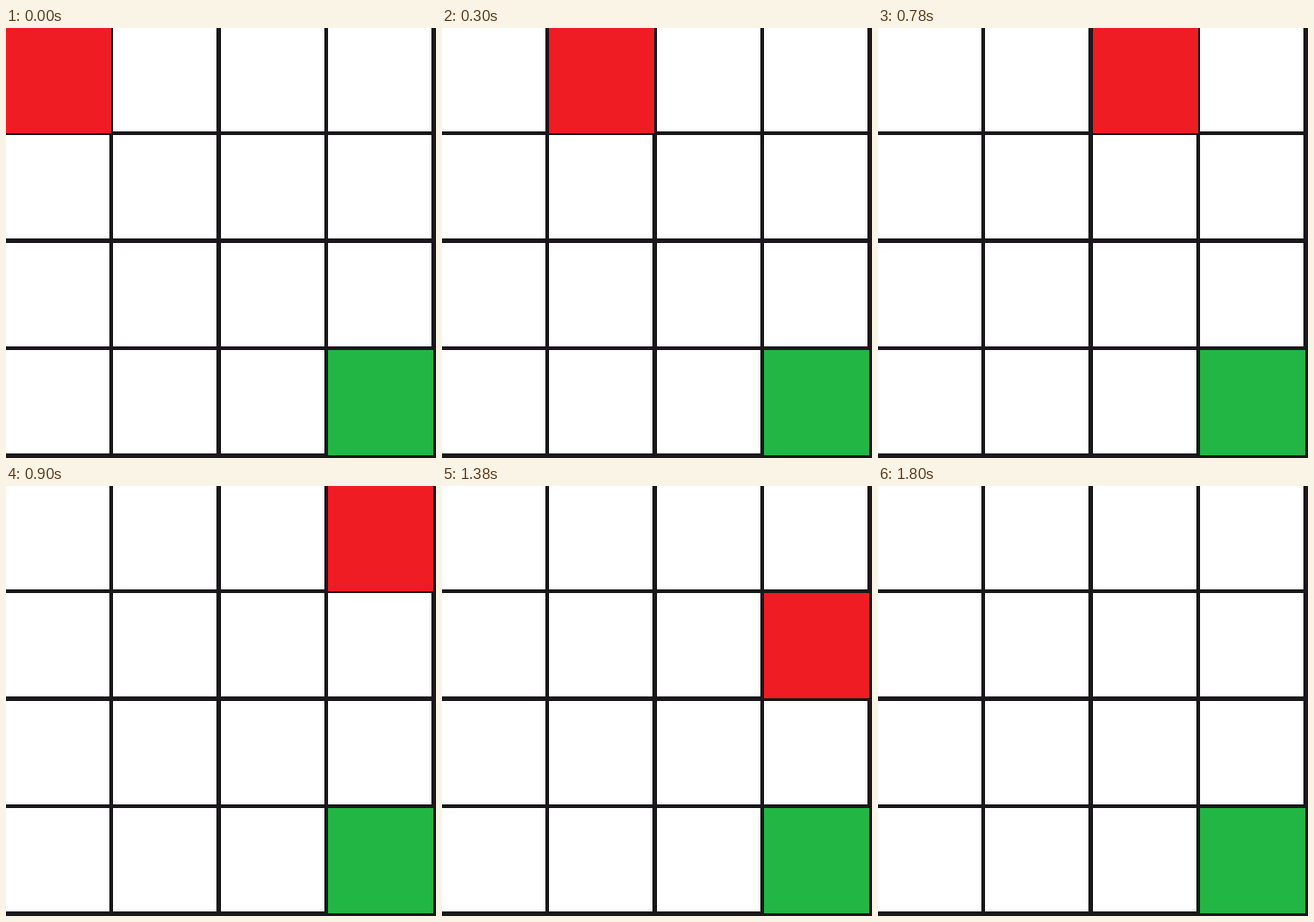
An HTML page with a canvas for the animation above (2.1 s loop, 470x470 px).

```html
<!DOCTYPE html>
<html lang="en">
<head>
<meta charset="utf-8">
<title>Grid path</title>
<style>
  html, body { margin: 0; width: 100%; height: 100%; overflow: hidden; }
  canvas { display: block; }
</style>
</head>
<body>
<canvas id="stage" width="470" height="470"></canvas>
<script>
const ctx = document.getElementById('stage').getContext('2d');
const SIZE = 4, PITCH = 117.5, STEP = 300;
const LAST = SIZE - 1, STEPS = 2 * LAST + 1;

function cell(col, row, side, color) {
  ctx.fillStyle = color;
  ctx.fillRect(Math.floor(col * PITCH), Math.floor(row * PITCH), side, side);
}

function draw(time) {
  const step = Math.floor(time / STEP) % STEPS;
  ctx.fillStyle = '#1a181b';
  ctx.fillRect(0, 0, 470, 470);
  for (let row = 0; row < SIZE; row++)
    for (let col = 0; col < SIZE; col++) cell(col, row, 113, '#fff');

  // Marker goes right along the top, then down; the goal covers it at the end.
  cell(Math.min(step, LAST), Math.max(step - LAST, 0), 115, '#f01c24');
  cell(LAST, LAST, 115, '#22b645');
}

const start = performance.now();
function tick() {
  draw(performance.now() - start);
  requestAnimationFrame(tick);
}
tick();
</script>
</body>
</html>
```
